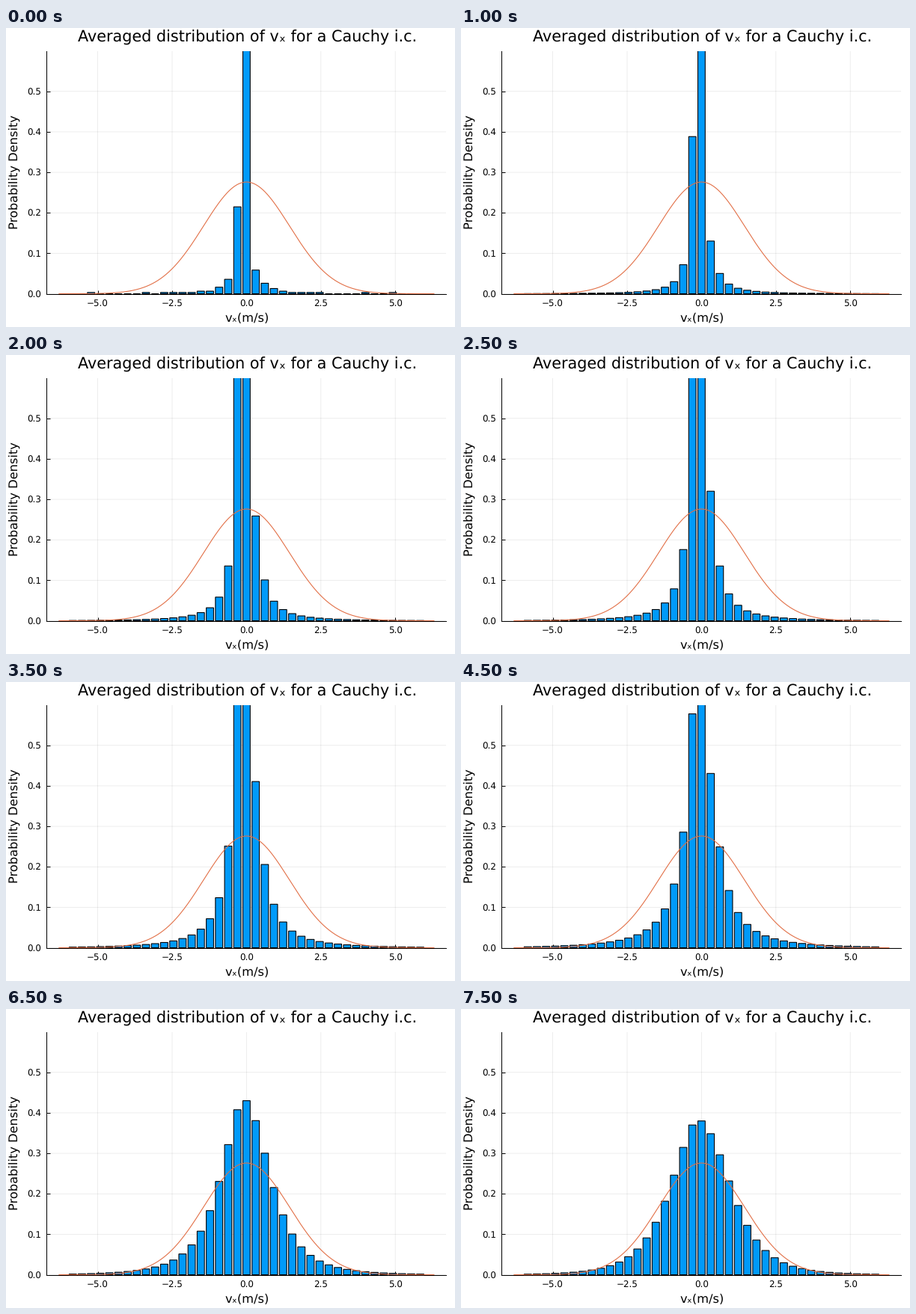
Animation of 600x400 px, one loop 8 s. Source, as a matplotlib script:

```python
import numpy as np
import matplotlib.pyplot as plt
from matplotlib.animation import FuncAnimation

W, H, DPI = 600, 400, 100
PX = 72 / DPI
FRAMES, INTERVAL = 16, 500
LEFT, RIGHT, TOP, BOTTOM = 54.4, 588.4, 30.6, 355.55
UNIT_X, UNIT_Y = 39.76, (BOTTOM - TOP) / 0.6
STEP, SIGMA, SAMPLES = 0.3073, 1.445, 1000
BLUE, ORANGE = "#009af9", "#e26f46"
BINS = np.arange(-19, 20)

plt.rcParams.update({"font.family": "DejaVu Sans", "text.hinting": "none"})

# The profile starts as a narrow Cauchy peak and relaxes to a bell.
TIMES = [0, 3, 5, 7, 9, 11, 13, 15]
PEAK = [1.9, 2.77, 1.4, 0.96, 0.70, 0.538, 0.43, 0.38]
WIDTH = [0.25, 0.36, 0.707, 1.12, 1.58, 2.65, 4.2, 6.0]
POWER = [1, 1, 1, 1, 1, 1.2, 1.55, 2]


def ease(n, values):
    return np.exp(np.interp(n, TIMES, np.log(values)))


def heights(n):
    peak, width, power = (ease(n, v) for v in (PEAK, WIDTH, POWER))
    h = peak * (1 + (BINS / width) ** 2) ** -power * np.exp(-BINS**2 / 500)
    # The left side starts out heavier and evens out with time.
    lean = max(0, 0.6 - 0.055 * n) / np.maximum(1, BINS**2) + 0.06 - 0.002 * n
    h *= np.exp(-np.sign(BINS) * lean)
    if n == 0:  # a single histogram, so only whole counts
        noise = np.random.default_rng(4).random(len(BINS))
        h = np.floor(h * SAMPLES * STEP + noise) / (SAMPLES * STEP)
    return h


def label(x, y, text, size, ha="center", **kw):
    fig.text(x / W, 1 - y / H, text, fontsize=size * PX, ha=ha, va="baseline", **kw)


fig = plt.figure(figsize=(W / DPI, H / DPI), dpi=DPI, facecolor="white")
ax = fig.add_axes([LEFT / W, 1 - BOTTOM / H, (RIGHT - LEFT) / W, (BOTTOM - TOP) / H])
half = (RIGHT - LEFT) / 2 / UNIT_X
ax.set(xlim=(-half, half), ylim=(0, 0.6))
ax.set_xticks(np.arange(-2, 3) * 2.5)
ax.set_yticks(np.arange(6) / 10)
ax.set_axisbelow(True)
ax.grid(color="black", alpha=0.1, lw=0.7 * PX, snap=False)
ax.tick_params(direction="in", length=5 * PX, width=PX, labelbottom=False, labelleft=False)
ax.spines[["top", "right"]].set_visible(False)
ax.spines[["left", "bottom"]].set_linewidth(PX)

label(322.3, 18.3, "Averaged distribution of vₓ for a Cauchy i.c.", 20.8)
label(321.8, 392.8, "vₓ(m/s)", 16.3)
label(15.6, 193, "Probability Density", 16.3, rotation=90, rotation_mode="anchor")
for v in ax.get_xticks():
    label((LEFT + RIGHT) / 2 + v * UNIT_X, 372.4, f"{v:.1f}".replace("-", "−"), 11.9)
for v in ax.get_yticks():
    label(47.6, BOTTOM - v * UNIT_Y + 5, f"{v:.1f}", 11.9, ha="right")

bars = ax.bar(BINS * STEP, heights(0), width=0.8 * STEP, color=BLUE,
              edgecolor="black", lw=1.1 * PX, snap=False, zorder=2.2)
xs = np.linspace(-6.3, 6.3, 400)
ax.plot(xs, np.exp(-(xs / SIGMA) ** 2 / 2) / (SIGMA * np.sqrt(2 * np.pi)),
        color=ORANGE, lw=1.1 * PX, zorder=2.4)


def draw(n):
    for bar, h in zip(bars, heights(n)):
        bar.set_height(h)
    return list(bars)


anim = FuncAnimation(fig, draw, frames=FRAMES, interval=INTERVAL,
                     repeat=True, repeat_delay=0)
plt.show()
```
